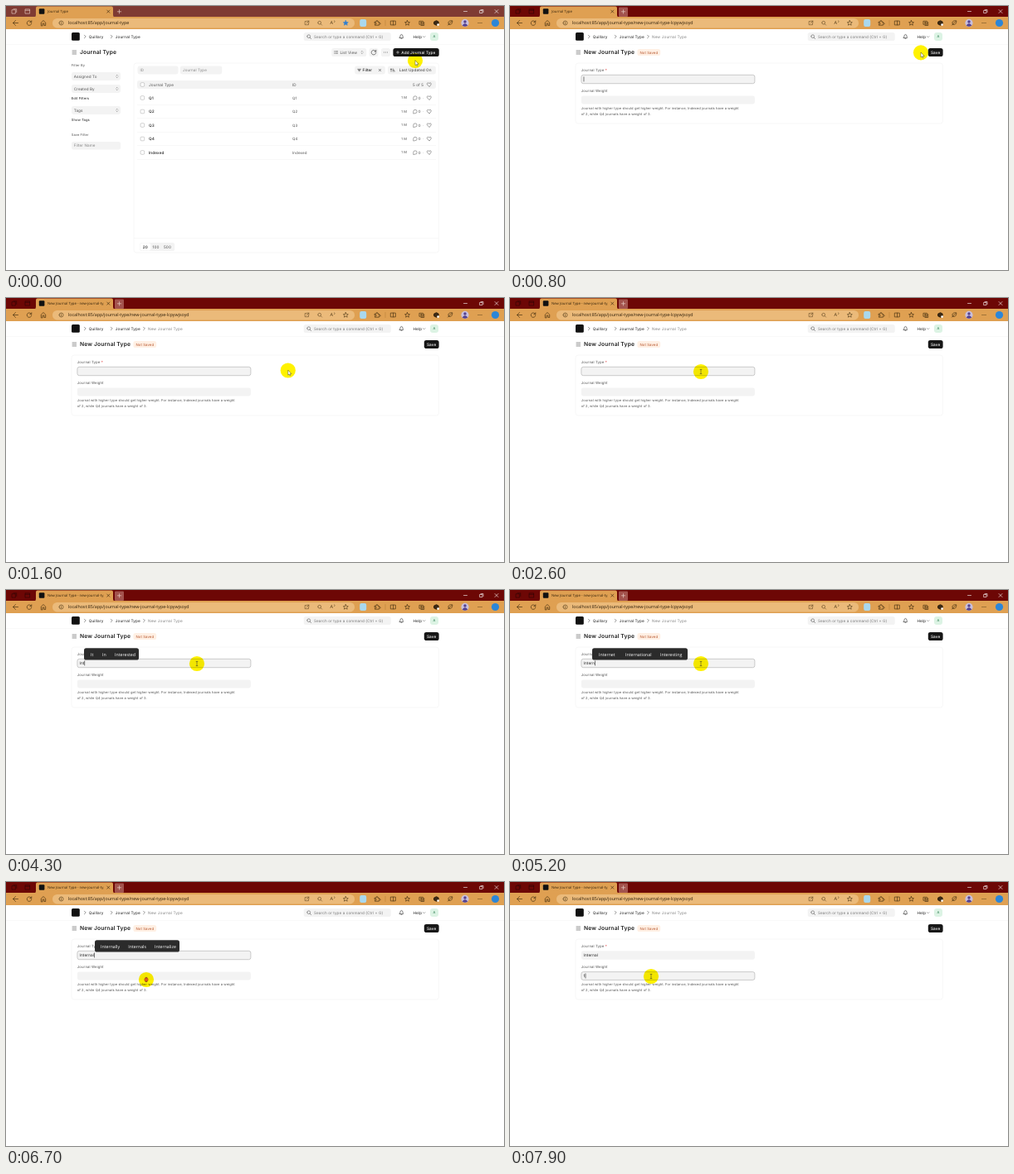
Recreate the animation shown at these times as an HTML page. Size 600 by 319 pixels, loop 8000 ms.

```html
<!DOCTYPE html>
<html lang="en">
<head>
<meta charset="utf-8">
<title>Journal Type</title>
<style>
  html, body { margin: 0; width: 100%; height: 100%; overflow: hidden; background: #fff; }
  svg { display: block; width: 600px; height: 319px; }
  text { font-family: Inter, sans-serif; letter-spacing: .02em; text-rendering: geometricPrecision; white-space: pre; }
  .ui { font-family: "Open Sans", sans-serif; letter-spacing: 0; }
  path { fill: none; stroke-linecap: round; stroke-linejoin: round; }
  #halo { mix-blend-mode: multiply; }
</style>
</head>
<body>
<svg id="stage" viewBox="0 0 600 319" xmlns="http://www.w3.org/2000/svg"></svg>
<script>
const LOOP = 8000, STEP = 100;
const INK = '#1f1f1f', MID = '#525252', SOFT = '#858585', FILL = '#f3f3f3', LINE = '#eeeeee';
const BAR_IDLE = '#7f3b33', BAR_ACTIVE = '#6d0705', TOOL = '#dfa052', TOOL_INK = '#4b3414';

// Markup helpers; text is centred vertically on y.
const text = (x, y, str, size = 4.69, color = INK, weight = 420, extra = '') =>
  `<text x="${x}" y="${y + size * .36}" font-size="${size}" fill="${color}" font-weight="${weight}" ${extra}>${str}</text>`;
const ui = (x, y, str, size, color, extra = '') => text(x, y, str, size, color, 400, `class="ui" ${extra}`);
const rect = (x, y, w, h, fill, r = 0, extra = '') =>
  `<rect x="${x}" y="${y}" width="${w}" height="${h}" rx="${r}" fill="${fill}" ${extra}/>`;
const circle = (x, y, r, fill, extra = '') => `<circle cx="${x}" cy="${y}" r="${r}" fill="${fill}" ${extra}/>`;
const icon = (x, y, d, color = MID, width = .6, extra = '') =>
  `<path transform="translate(${x} ${y})" d="${d}" stroke="${color}" stroke-width="${width}" ${extra}/>`;
const group = (id, body, extra = '') => `<g id="${id}" ${extra}>${body}</g>`;

const D = {
  cross: 'M-1.6-1.6L1.6 1.6M-1.6 1.6L1.6-1.6',
  plus: 'M-2.2 0H2.2M0-2.2V2.2',
  right: 'M-.9-1.8L.9 0L-.9 1.8',
  down: 'M-1.2-.6L0 .6L1.2-.6',
  upDown: 'M-.9-.8L0-1.7L.9-.8M-.9.8L0 1.7L.9.8',
  back: 'M3 0H-3M0-3L-3 0L0 3',
  reload: 'M2.6-1A2.8 2.8 0 1 0 2.8.6M2.8-2.8V-.9H.9',
  home: 'M-2.7 3V-.5L0-3L2.7-.5V3H.9V.6H-.9V3Z',
  box: 'M-2.6-2.6H2.6V2.6H-2.6Z',
  lens: 'M1.2 1.2L2.6 2.6M-2.2-.3A1.9 1.9 0 1 0 1.6-.3A1.9 1.9 0 1 0-2.2-.3',
  star: 'M0-3L.9-1L3-.8L1.4.6L1.9 2.7L0 1.6L-1.9 2.7L-1.4.6L-3-.8L-.9-1Z',
  heart: 'M0 2.3L-2.2 0C-3.4-1.7-1-3.2 0-1.3C1-3.2 3.4-1.7 2.2 0Z',
  bell: 'M-2.2 1.4H2.2C1.3.4 1.8-2.6 0-2.6S-1.3.4-2.2 1.4ZM-.6 2.4H.6',
  chat: 'M-2.2 2.2V0A2.2 2.2 0 1 1 0 2.2Z',
  menu: 'M-2.3-2H2.3M-2.3 0H2.3M-2.3 2H2.3',
  dots: 'M-2 0H-1.95M0 0H.05M2 0H2.05',
  funnel: 'M-1.8-1.2H1.8M-1.1 0H1.1M-.4 1.2H.4',
  sort: 'M-2 1.6V-1.6M-2.8-.8L-2-1.6L-1.2-.8M0-1.4H.8M0 0H1.6M0 1.4H2.4',
  out: 'M-.3-2H-2.3V2.2H2V.2M.4-2.4H2.4V-.4M2.4-2.4L-.2.2',
  puzzle: 'M-2.6-1.4H-.9A1 1 0 1 1 .9-1.4H2.3V.2A1 1 0 1 1 2.3 1.4V2.7H-2.6V1.4A1 1 0 1 0-2.6.1Z',
  pages: 'M-2.7-2.2H1.4V1.8H-2.7ZM-1 3H2.7V-1M-.6-1.2V.9M-1.7-.2H.4',
  leaf: 'M-2.5 2.6L2-2M-1.6 1.6C-3.6-2.4.5-3 2.8-2.7C3 1 .6 3.2-1.6 1.6'
};

function browser() {
  const tool = (x, d, w = .7) => icon(x, 20.5, d, TOOL_INK, w);
  return rect(0, 0, 600, 14, BAR_ACTIVE, 0, 'id="bar"') +
    group('barIcons', icon(10, 6.5, 'M-2.6-1.8H1.4V2.6H-2.6ZM-1-2.8H2.7V1') + icon(26, 6.5, D.box + 'M-2.6-1.2H2.6')) +
    rect(131, 1.5, 11, 11.5, '#a3534d', 1, 'id="plusBox"') +
    rect(0, 13, 600, 15, TOOL) +
    `<path d="M34 13.5Q36 13 36 11V2.5Q36 .5 38 .5H127Q129 .5 129 2.5V11Q129 13 131 13.5Z" style="fill:${TOOL}"/>` +
    rect(39.8, 3.2, 6.6, 6.6, '#111', 1) +
    ui(50, 6.6, '', 4.3, '#33220c', 'id="tabTitle" clip-path="url(#tabClip)"') +
    icon(123.3, 6.6, D.cross, '#33220c', .6) + icon(136.5, 6.8, D.plus, '#f0dcd4') +
    icon(553.5, 6.5, 'M-2 0H2', '#fff') + icon(573, 6.5, 'M-2-1H1V2H-2ZM-1-2H2V1', '#fff') + icon(591, 6.5, 'M-2-2L2 2M-2 2L2-2', '#fff') +
    tool(11.5, D.back) + tool(28, D.reload) + tool(45, D.home) +
    rect(56, 15, 364, 11.4, '#ebba7a', 5.5) +
    icon(66.5, 20.5, 'M-2.5 0A2.5 2.5 0 1 0 2.5 0A2.5 2.5 0 1 0-2.5 0M0 0V1.2M0-1.2V-1.15', TOOL_INK) +
    ui(75, 20.4, '', 5.32, '#2c1d09', 'id="url"') +
    tool(362.5, D.out, .5) + tool(378, D.lens, .5) + ui(390.5, 20.4, 'A', 5.6, TOOL_INK) + icon(395.7, 18.5, 'M0-.8Q1 .2 0 1.2', TOOL_INK, .5) +
    icon(409.3, 20.5, D.star, TOOL_INK, .6, 'id="fav"') +
    rect(426.2, 16, 8, 9, '#a9d8ee', 2) +
    tool(447, D.puzzle) + icon(457, 20.5, 'M0-3V3', '#b27b36', .5) +
    tool(466.5, 'M-2.8-2.4H2.8V2.4H-2.8ZM0-2.4V2.4') + tool(483.5, D.star) + tool(501, D.pages) +
    icon(518.5, 20.5, 'M-2.6-1.5L0-2.8L2.6-1.5V1.5L0 2.8L-2.6 1.5Z', '#2b1c0a', .9, 'style="fill:#3b2a16"') + circle(520.6, 22.6, 1.3, '#fff') +
    tool(535, D.leaf) +
    circle(553, 20.4, 4.6, '#c9bfdc') + circle(553, 19, 1.7, '#53408f') + `<path d="M549.7 23.5Q553 18.8 556.3 23.5Q553 26 549.7 23.5Z" style="fill:#53408f"/>` +
    icon(571, 20.5, D.dots, TOOL_INK, 1) + circle(589.5, 20.5, 4.6, '#2c86d8');
}

function navbar() {
  return rect(79, 32, 9.8, 9.8, '#111', 1.5) + icon(95.3, 37, D.right) + text(99.8, 37, 'Quillary', 4.69, INK) +
    icon(127.3, 37, D.right) + text(131.8, 37, 'Journal Type') +
    rect(358.7, 32, 105, 10, FILL, 2.6) + icon(365, 37, D.lens, MID, .55) + text(371, 37, 'Search or type a command (Ctrl + G)', 4.6, '#777') +
    icon(476.5, 37, D.bell, INK, .55) + text(490.5, 37, 'Help') + icon(503.8, 37.2, D.down, MID, .5) +
    rect(511, 32, 10, 10, '#dcf3e4', 3.3) + text(516, 37, 'A', 4, '#39845a', 500, 'text-anchor="middle"') +
    rect(0, 46, 600, .4, '#efefef') + icon(82.3, 56, D.menu, MID, .6);
}

function listPage() {
  const pick = (y, label) => rect(79, y, 59, 10, FILL, 2.4) + text(81.7, y + 5, label, 4.6, MID) + icon(133.8, y + 5, D.upDown, MID, .45);
  const check = y => rect(162.1, y - 2.3, 4.6, 4.6, '#fff', 1.1, 'stroke="#999" stroke-width=".45"');
  const row = (name, i) => {
    const y = 111 + i * 16.5;
    return check(y) + text(172, y, name, 4.69, INK, 520) + text(345, y, name, 4.5, MID) +
      text(476.2, y, '1 M', 4.1, MID) + icon(493, y, D.chat, MID, .5) + text(496.8, y, '0', 4.5, MID) +
      text(502.3, y, '·', 4.5, MID) + icon(509.8, y, D.heart, MID, .55) + rect(158, y + 8.1, 360, .4, LINE);
  };
  return text(89, 56, 'Journal Type', 6.75, INK, 600) +
    rect(392.3, 51, 42, 10, FILL, 2.6) + icon(397.8, 56, 'M-1-1.4H1.8M-1 0H1.8M-1 1.4H1.8M-2.2-1.4H-2.1M-2.2 0H-2.1M-2.2 1.4H-2.1', MID, .5) +
    text(402.4, 56, 'List View', 4.69, MID) + icon(429, 56, D.upDown, MID, .45) +
    rect(437.5, 51, 11, 10, FILL, 2.6) + icon(443, 56, D.reload, INK, .55, 'transform-origin="0 0"') +
    rect(452, 51, 11, 10, FILL, 2.6) + icon(457.5, 56, D.dots, MID, .8) +
    rect(466.4, 51, 55.3, 10, '#171717', 2.6) + icon(472, 56, 'M-1.5 0H1.5M0-1.5V1.5', '#fff', .5) + text(476.3, 56, 'Add Journal Type', 4.69, '#fff', 500) +
    text(78.8, 71.5, 'Filter By', 4, MID) + pick(80, 'Assigned To') + pick(95, 'Created By') +
    text(78.8, 112, 'Edit Filters', 4.1) + pick(121, 'Tags') + text(78.8, 138, 'Show Tags', 4.1) +
    text(78.8, 155.5, 'Save Filter', 4, MID) + rect(79, 164, 59, 9.6, FILL, 2.4) + text(81.7, 168.8, 'Filter Name', 4.6, SOFT) +
    rect(154, 69, 367.4, 229, '#fff', 3, `stroke="${LINE}" stroke-width=".5"`) +
    rect(158.5, 72.6, 49, 9.8, FILL, 2.4) + text(161.5, 77.5, 'ID', 4.5, SOFT) +
    rect(209.8, 72.6, 50.5, 9.8, FILL, 2.4) + text(213, 77.5, 'Journal Type', 4.5, SOFT) +
    rect(420.2, 72.6, 36.6, 9.8, FILL, 2.4) + icon(425.6, 77.5, D.funnel, INK, .55) + text(429.6, 77.5, 'Filter', 4.6, INK, 460) +
    icon(450.5, 77.5, 'M-1.2-1.2L1.2 1.2M-1.2 1.2L1.2-1.2', INK, .5) +
    rect(459.9, 72.6, 58, 9.8, FILL, 2.4) + icon(466, 77.5, D.sort, INK, .5) + text(473.8, 77.5, 'Last Updated On', 4.69, MID, 460) +
    rect(158, 90, 360, 10, FILL, 2.4) + check(95) + text(172, 95, 'Journal Type', 4.69, MID) + text(345, 95, 'ID', 4.69, MID) +
    text(490, 95, '5 of 5', 4.6, MID) + icon(509.8, 95, D.heart, MID, .55) +
    ['Q1', 'Q2', 'Q3', 'Q4', 'Indexed'].map(row).join('') +
    rect(154, 280.6, 367.4, .4, LINE) + rect(161.2, 286, 42, 10, FILL, 2.6) + rect(161.7, 286.4, 12.6, 9.2, '#fff', 2.4) +
    text(164.8, 291, '20', 4.69, INK, 500) + text(176.5, 291, '100', 4.69, MID) + text(190, 291, '500', 4.69, MID);
}

function formPage() {
  const field = (id, y, h) => rect(85.9, y, 209, h, FILL, 2.4, `id="${id}" stroke-width=".6"`);
  return icon(166.5, 37, D.right) + text(171, 37, 'New Journal Type', 4.69, SOFT) +
    text(89, 56, 'New Journal Type', 6.75, INK, 600) +
    rect(153.4, 52, 27.8, 8, '#fff0e4', 2.6) + text(156.4, 56, 'Not Saved', 4.3, '#b5532a') +
    rect(503.8, 51, 17.8, 10, '#171717', 2.6) + text(507, 56, 'Save', 4.69, '#fff', 500) +
    rect(79, 69, 442.4, 73, '#fff', 3, `stroke="${LINE}" stroke-width=".5"`) +
    text(85.8, 77.5, 'Journal Type <tspan fill="#e03636">*</tspan>', 4.3, MID) + field('typeField', 83.3, 10.4) +
    text(85.8, 102.6, 'Journal Weight', 4.3, MID) + field('weightField', 108.6, 9.8) +
    text(85.8, 123.3, 'Journal with higher type should get higher weight. For instance, Indexed journals have a weight', 4.05, MID) +
    text(85.8, 130.2, 'of 2, while Q4 journals have a weight of 3.', 4.05, MID) +
    text(88.6, 88.5, '', 4.69, INK, 420, 'id="typed"') + text(88.6, 113.5, '', 4.69, INK, 420, 'id="weight"') +
    rect(0, 0, .55, 6, '#111', 0, 'id="caret"') + group('popup', '');
}

document.getElementById('stage').innerHTML =
  '<clipPath id="tabClip"><rect x="49" y="0" width="68.5" height="13"/></clipPath>' +
  rect(0, 0, 600, 319, '#fff') + browser() + navbar() + group('list', listPage()) + group('form', formPage()) +
  circle(0, 0, 9.1, '#fff200', 'id="halo"') +
  group('pointer',
    group('arrow', '<path d="M0 0V5.6L1.3 4.5L2.2 6.4L3 6L2.2 4.2H3.9Z" style="fill:#fff" stroke="#222" stroke-width=".4"/>') +
    group('beam', icon(0, 0, 'M-.9-2.6H.9M0-2.6V2.6M-.9 2.6H.9', '#333', .5)) +
    group('press', circle(0, 0, 2.2, '#e0442a', 'fill-opacity=".75" stroke="#a31c10" stroke-width=".5"')));

const el = {};
document.querySelectorAll('svg [id]').forEach(node => el[node.id] = node);

// Timed tables: [start ms, value...]
const TYPED = [[0, ''], [3400, 'I'], [3600, 'In'], [4000, 'Int'], [4500, 'Inte'], [4900, 'Inter'], [5200, 'Intern'], [5400, 'Interna'], [5500, 'Internal']];
const WEIGHT = [[0, ''], [7900, '1']];
const CARET = [[0, 1], [1600, 0], [2100, 1], [2600, 0], [3100, 1], [6000, 0], [6500, 1], [7300, 0], [7800, 1]];
// Popup: left, right, then word / x pairs.
const POPUP = [
  [0], [3900, 94, 189, 'In', 102, 'Individual', 118, 'Information', 155],
  [4300, 94, 160, 'It', 102, 'In', 116, 'Interested', 131],
  [4500, 94, 171, 'Into', 102, 'Inter', 123, 'Internet', 145], [4700],
  [4900, 99, 214, 'Internet', 107, 'International', 139, 'Interesting', 181], [5400],
  [5700, 107, 209, 'Internally', 114, 'Internals', 147.3, 'Internalize', 179], [6800]
];
const PATH = [
  [0, 493, 66], [100, 493, 66], [400, 495, 57], [1000, 495, 56], [1100, 494, 57], [1500, 375, 84], [1900, 234, 98], [2300, 230, 89],
  [5600, 230, 89], [6000, 201, 105], [6400, 174, 124], [6700, 169, 118], [6900, 169, 118], [7300, 170, 114], [LOOP, 170, 114]
];
const PRESS = [[500, 600], [6700, 6800]];

const at = (table, t) => table.findLast(row => row[0] <= t);
const show = (node, on) => node.setAttribute('visibility', on ? 'inherit' : 'hidden');
const set = (node, attrs) => { for (const k in attrs) node.setAttribute(k, attrs[k]); };

function pointerAt(t) {
  const i = PATH.findIndex(p => p[0] > t);
  const [t0, x0, y0] = PATH[i - 1], [t1, x1, y1] = PATH[i];
  const k = (t - t0) / (t1 - t0);
  return [x0 + (x1 - x0) * k, y0 + (y1 - y0) * k];
}

function draw(t) {
  const form = t >= 700, active = t >= 500, second = t >= 6800;
  show(el.list, !form);
  show(el.form, form);
  show(el.plusBox, active);
  set(el.bar, { fill: active ? BAR_ACTIVE : BAR_IDLE });
  el.barIcons.querySelectorAll('path').forEach(p => set(p, { stroke: active ? '#2d0505' : '#ecd5cc' }));
  el.fav.style.fill = form ? 'none' : '#2f7fd0';
  set(el.fav, { stroke: form ? TOOL_INK : '#2f7fd0' });
  el.tabTitle.textContent = t >= 1100 ? 'New Journal Type - new-journal-type' : 'Journal Type';
  el.url.textContent = 'localhost:85/app/journal-type' + (form ? '/new-journal-type-lcpywjsoyd' : '');

  el.typed.textContent = at(TYPED, t)[1];
  el.weight.textContent = at(WEIGHT, t)[1];
  set(el.typeField, { stroke: second ? 'none' : '#a9a9a9' });
  set(el.weightField, { stroke: second ? '#a9a9a9' : 'none' });
  const entry = second ? el.weight : el.typed;
  set(el.caret, { x: 88.7 + (entry.textContent ? entry.getComputedTextLength() : 0), y: second ? 110.4 : 85.4 });
  show(el.caret, form && at(CARET, t)[1]);

  const [, left, right, ...words] = at(POPUP, t);
  let body = left ? rect(left, 70.3, right - left, 14.2, '#2b2b2b', 2.6) : '';
  for (let i = 0; i < words.length; i += 2) body += ui(words[i + 1], 78.3, words[i], 5.25, '#fff');
  el.popup.innerHTML = body;

  const [x, y] = pointerAt(t);
  const overField = form && x > 86 && x < 295 && ((y > 83 && y < 94) || (y > 108 && y < 118.5));
  set(el.halo, { cx: x, cy: y });
  set(el.pointer, { transform: `translate(${x} ${y})` });
  show(el.beam, overField);
  show(el.arrow, !overField);
  show(el.press, PRESS.some(([a, b]) => t >= a && t < b));
}

const start = performance.now();
let last = -1;
function tick() {
  const t = Math.floor(((performance.now() - start) % LOOP) / STEP) * STEP;
  if (t !== last) draw(last = t);
  requestAnimationFrame(tick);
}
tick();
</script>
</body>
</html>
```
